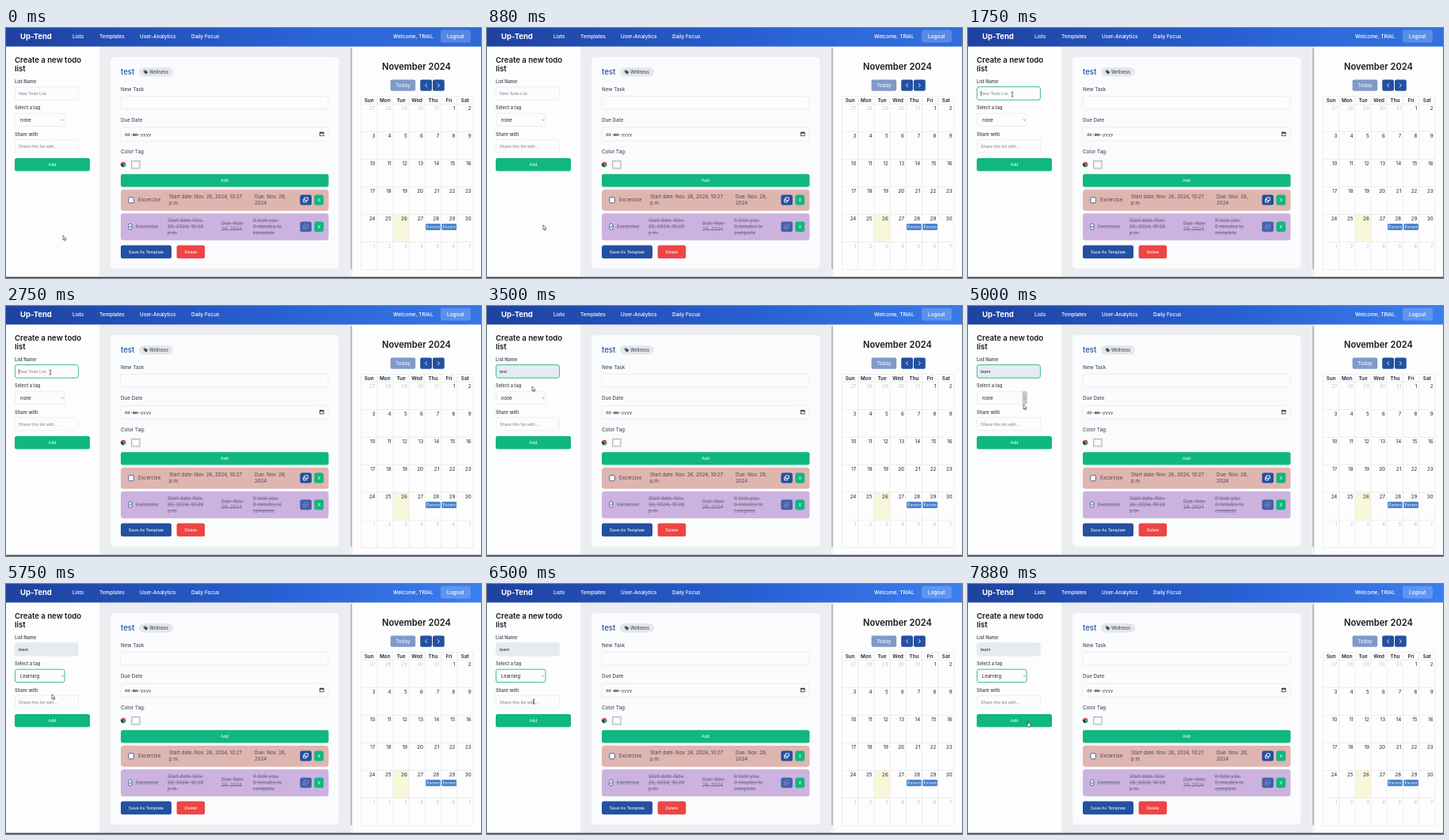
An HTML page for the animation above (8 s loop, 600 px wide and 317 px high).

```html
<!DOCTYPE html>
<html lang="en">
<head>
<meta charset="utf-8">
<title>Todo lists</title>
<style>
html, body { margin: 0; width: 100%; height: 100%; overflow: hidden; background: #fdfdfd; }
svg { display: block; width: 100vw; height: 100vh; }
text { font: 500 6.25px Inter, sans-serif; fill: #4a5260; white-space: pre; }
.nav text { font-size: 6.45px; fill: #fff; }
.nav .brand { font-size: 9.5px; font-weight: 700; }
.title { font-size: 9.6px; font-weight: 600; fill: #14181f; }
.label text { font-size: 5.7px; font-weight: 600; }
.field { fill: #fcfcfd; stroke: #e5e7eb; stroke-width: .7; }
.focus { stroke: #3fba92; stroke-width: 1; }
.filled { fill: #e4ecf1; }
text.value { font: 400 5.55px "Liberation Sans", Arial, sans-serif; fill: #1b1f27; }
text.hint { fill: #7d8490; }
text.pick { font-size: 5.8px; font-weight: 400; fill: #1b1f27; }
text.date { font: 400 5.55px "Liberation Mono", monospace; fill: #222; }
text.btn { font: 400 5.55px "Liberation Sans", Arial, sans-serif; fill: #fff; text-anchor: middle; }
.green { fill: #10b77f; }
.blue { fill: #2350a0; }
.red { fill: #ef4444; }
.task text { font-weight: 400; font-size: 6.2px; fill: #4d4548; }
.task.done text { fill: #75688a; text-decoration: line-through; }
.task text.btn { font-size: 6.6px; fill: #fff; text-decoration: none; }
.line { fill: none; stroke: #fff; stroke-width: .9; stroke-linecap: round; stroke-linejoin: round; }
.grid { fill: none; stroke: #e1e3e8; stroke-width: .6; }
text.month { font-size: 11.1px; font-weight: 600; fill: #14181f; }
text.week { font-weight: 600; text-anchor: middle; fill: #20242c; }
text.day { font-weight: 400; text-anchor: end; fill: #20242c; }
text.other { fill: #c3c5c9; }
text.event { font-size: 5.4px; font-weight: 400; fill: #fff; }
</style>
</head>
<body>
<svg viewBox="0 0 600 317" preserveAspectRatio="none">
  <defs>
    <linearGradient id="bar">
      <stop offset="0" stop-color="#1e429f"/><stop offset=".55" stop-color="#285fd0"/><stop offset="1" stop-color="#3b7eee"/>
    </linearGradient>
    <linearGradient id="dim">
      <stop offset=".6" stop-color="#1f4fb8" stop-opacity="0"/><stop offset="1" stop-color="#1f4fb8" stop-opacity=".45"/>
    </linearGradient>
  </defs>

  <rect width="600" height="317" fill="#fdfdfd"/>
  <rect x="118" y="23" width="316" height="292" fill="#ebedf0"/>
  <rect x="434" y="23" width="4" height="292" fill="#f1f2f4"/>
  <rect x="435" y="25" width="2" height="281" rx="1" fill="#b6bcc5"/>
  <rect y="315.6" width="600" height="1.4" fill="#45484d"/>

  <g class="nav">
    <rect width="600" height="23.5" fill="url(#bar)"/>
    <rect id="shade" width="600" height="23.5" fill="url(#dim)"/>
    <text class="brand" x="18" y="14">Up-Tend</text>
    <text x="84" y="12.9">Lists</text>
    <text x="118" y="12.9">Templates</text>
    <text x="169" y="12.9">User-Analytics</text>
    <text x="234" y="12.9">Daily Focus</text>
    <text x="489" y="12.9">Welcome, TRIAL</text>
    <rect x="549" y="2.5" width="38" height="16" rx="3" fill="#fff" fill-opacity=".2"/>
    <text x="557" y="12.9">Logout</text>
  </g>

  <text class="title" x="11" y="44">Create a new todo</text>
  <text class="title" x="11" y="55">list</text>
  <g class="label">
    <text x="11" y="70">List Name</text>
    <text x="11" y="103.3">Select a tag</text>
    <text x="11" y="137.2">Share with</text>
  </g>
  <rect id="name" class="field" x="11.4" y="74.6" width="80" height="16.6" rx="2.5"/>
  <text id="nameText" class="value" x="16" y="85"></text>
  <path id="caret" d="M16.4 79.8v6.6" stroke="#222" stroke-width=".6"/>
  <rect id="tag" class="field" x="11.4" y="108.2" width="62.6" height="16.4" rx="2.5"/>
  <rect id="tagHover" x="68.6" y="108" width="6.2" height="16.8" rx="1.5" fill="#c5c8cd"/>
  <text id="tagText" class="pick" x="18" y="118.8"></text>
  <path d="M69.8 116l1.4 1.4 1.4-1.4" fill="none" stroke="#666" stroke-width=".7"/>
  <rect class="field" x="11.4" y="141.4" width="80" height="16.6" rx="2.5"/>
  <text class="value hint" x="16" y="151.9">Share this list with...</text>
  <rect class="green" x="11" y="165" width="95" height="16.6" rx="2.5"/>
  <text class="btn" x="58.5" y="175.3">Add</text>

  <rect x="132" y="37" width="288.5" height="268" rx="4.5" fill="#fafbfc"/>
  <text x="145" y="58.8" style="font-size:9.6px;fill:#2350a0">test</text>
  <rect x="168" y="50" width="43" height="11.4" rx="5.7" fill="#e5e7eb"/>
  <path d="M173.8 53.4h2.8l2.8 2.8-2.6 2.6-3-3z" fill="#434b58"/>
  <circle cx="175.1" cy="54.7" r=".5" fill="#e5e7eb"/>
  <text x="181" y="57.8" style="font-size:5.6px">Wellness</text>
  <text x="145" y="79.8">New Task</text>
  <rect class="field" x="145" y="86.4" width="262" height="16.4" rx="2.5"/>
  <text x="145" y="119">Due Date</text>
  <rect class="field" x="145" y="126.2" width="262" height="17" rx="2.5"/>
  <text class="date" x="150" y="136.6">dd-<tspan font-weight="700">mm</tspan>-yyyy</text>
  <g fill="none" stroke="#222" stroke-width=".7">
    <rect x="396.6" y="132.4" width="4.6" height="4.4"/>
    <path d="M396.6 133.2h4.6M397.7 131.5v1M400.1 131.5v1" stroke-width="1"/>
  </g>
  <text x="145" y="159">Color Tag:</text>
  <path d="M148.2 173l-2.9-1.7a3.4 3.4 0 0 1 6.2.9z" fill="#e0403a"/>
  <path d="M148.2 173l3.3-.8a3.4 3.4 0 0 1-3 4.2z" fill="#1ca765"/>
  <path d="M148.2 173l.3 3.4a3.4 3.4 0 0 1-3.2-5.1z" fill="#30343a"/>
  <rect x="158.6" y="168.4" width="10.6" height="9.8" fill="#efefef" stroke="#a4a7ab" stroke-width=".8"/>
  <rect x="160" y="169.8" width="7.8" height="7" fill="#fff" stroke="#c6c8cb" stroke-width=".4"/>
  <rect class="green" x="145" y="185.2" width="262.5" height="16.4" rx="2.5"/>
  <text class="btn" x="276" y="195.4">Add</text>

  <g class="task">
    <rect x="145" y="205" width="262.5" height="26.8" rx="3.5" fill="#dfb5b0"/>
    <rect x="154.8" y="214.8" width="6.6" height="7" rx="1.5" fill="#fff" stroke="#33558f" stroke-width=".9"/>
    <text x="167" y="219.8">Excercise</text>
    <text x="206" y="216">Start date: Nov. 26, 2024, 10:27</text>
    <text x="206" y="223.6">p.m.</text>
    <text x="314" y="216">Due: Nov. 28,</text>
    <text x="314" y="223.6">2024</text>
    <rect class="blue" x="371.4" y="211.6" width="14.6" height="12.8" rx="2.5"/>
    <path class="line" d="M377.4 215h4v3.6h-4zM377 217.2h-1.4v3.6h4v-1.6"/>
    <rect class="green" x="389.4" y="211.6" width="11.8" height="12.8" rx="2.5"/>
    <text class="btn" x="395.3" y="220.2">x</text>
  </g>
  <g class="task done">
    <rect x="145" y="235" width="262.5" height="34.2" rx="3.5" fill="#ccb3df"/>
    <rect x="154.8" y="248.2" width="4.2" height="7.4" rx="1.4" fill="#fff" stroke="#33558f" stroke-width=".9"/>
    <path d="M155.8 252l.9 1.2 1.5-3" fill="none" stroke="#33558f" stroke-width=".8"/>
    <text x="164" y="253.8">Excercise</text>
    <text x="204" y="246.2">Start date: Nov.</text>
    <text x="204" y="253.8">26, 2024, 10:28</text>
    <text x="204" y="261.6">p.m.</text>
    <text x="272" y="249.8">Due: Nov.</text>
    <text x="272" y="257.4">29, 2024</text>
    <text x="312" y="246.2">It took you:</text>
    <text x="312" y="253.8">0 minutes to</text>
    <text x="312" y="261.6">complete</text>
    <rect x="371.4" y="245.6" width="14.6" height="12.8" rx="2.5" fill="#4660aa"/>
    <path class="line" d="M377.4 249h4v3.6h-4zM377 251.2h-1.4v3.6h4v-1.6" opacity=".25"/>
    <rect class="green" x="389.4" y="245.6" width="11.8" height="12.8" rx="2.5"/>
    <text class="btn" x="395.3" y="254.2">x</text>
  </g>
  <rect class="blue" x="145" y="275.6" width="64" height="16.6" rx="2.5"/>
  <text class="btn" x="177" y="285.9">Save As Template</text>
  <rect class="red" x="215.6" y="275.6" width="35.6" height="16.6" rx="2.5"/>
  <text class="btn" x="233.4" y="285.9">Delete</text>

  <text class="month" x="475" y="53.2">November 2024</text>
  <rect x="485.6" y="65.6" width="31.6" height="14.2" rx="2" fill="#7f9aca"/>
  <text x="501.4" y="75" text-anchor="middle" style="fill:#eef2f9">Today</text>
  <rect class="blue" x="523.2" y="65.6" width="14.8" height="14.2" rx="2"/>
  <rect class="blue" x="539" y="65.6" width="14.8" height="14.2" rx="2"/>
  <path class="line" d="M531.6 70.6l-2 2.1 2 2.1M545.4 70.6l2 2.1-2 2.1"/>
  <g id="calendar"></g>

  <g id="pointer">
    <path id="arrow" d="M0 0v6l1.4-1.2 1 2.1.9-.4-1-2h1.9z" fill="#fff" stroke="#222" stroke-width=".6"/>
    <path id="beam" d="M-1.3-2.8q1.3 0 1.3.8q0-.8 1.3-.8M0-2v4.4M-1.3 3.2q1.3 0 1.3-.8q0 .8 1.3.8" fill="none" stroke="#222" stroke-width=".7"/>
    <path id="hand" d="M-.6-1.6q.6-.8 1.2 0v2.2l2 .5q.6.3.4 1.2l-.5 2.5h-3.1l-1.9-2.6q.1-.9 1.2-.2l.7.6z" fill="#fff" stroke="#222" stroke-width=".6"/>
  </g>
</svg>
<script>
const $ = id => document.getElementById(id);
const LOOP = 8000, STEP = 125;

function add(name, attrs, text) {
  const el = document.createElementNS("http://www.w3.org/2000/svg", name);
  for (const key in attrs) el.setAttribute(key, attrs[key]);
  if (text !== undefined) el.textContent = text;
  $("calendar").append(el);
}

function drawCalendar() {
  const left = 448.5, top = 96.4, w = 20.2, h = 35, right = left + 7 * w, bottom = top + 6 * h;
  add("rect", { x: left + 2 * w, y: top + 4 * h, width: w, height: h, fill: "#f9f7d9" });
  let lines = `M${left} 86.6H${right}`;
  for (let r = 0; r <= 6; r++) lines += `M${left} ${top + r * h}H${right}`;
  for (let c = 0; c <= 7; c++) lines += `M${left + c * w} 86.6V${bottom}`;
  add("path", { d: lines, class: "grid" });
  "Sun Mon Tue Wed Thu Fri Sat".split(" ").forEach((day, c) =>
    add("text", { x: left + (c + .5) * w, y: 93.8, class: "week" }, day));
  for (let i = 0; i < 42; i++) {
    const n = i - 4, inMonth = n > 0 && n <= 30;
    const day = n < 1 ? n + 31 : n > 30 ? n - 30 : n;
    add("text", {
      x: left + (i % 7 + 1) * w - 2.3, y: top + Math.floor(i / 7) * h + 7.8,
      class: inMonth ? "day" : "day other"
    }, day);
  }
  for (const c of [4, 5]) {
    const x = left + c * w + .9;
    add("rect", { x, y: 248.2, width: w - 1.6, height: 8, rx: 1.2, fill: "#3f7cc9" });
    add("text", { x: x + 1, y: 254.2, class: "event" }, "Excerc");
  }
}

// time, x, y
const path = [
  [0, 72, 263], [750, 72, 263], [1500, 56, 84], [2750, 56, 84], [3375, 57, 102],
  [3750, 57, 102], [4125, 57, 112], [4375, 58, 112], [4875, 70, 125], [5250, 70, 125],
  [5750, 58, 140], [6250, 59, 149], [6625, 59, 149], [7250, 75, 176], [7875, 76, 176], [8000, 76, 176]
];

function pointerAt(t) {
  const i = path.findIndex(p => p[0] > t), [t0, x0, y0] = path[i - 1], [t1, x1, y1] = path[i];
  const u = (t - t0) / (t1 - t0), k = u * u * (3 - 2 * u);
  return [x0 + (x1 - x0) * k, y0 + (y1 - y0) * k];
}

const show = (id, on) => { $(id).style.display = on ? "" : "none"; };

function draw(t) {
  const [x, y] = pointerAt(t);
  const within = (a, b) => y > a && y < b;
  const shape = within(165, 182) ? "hand" : within(74, 91) || within(141, 158) ? "beam" : "arrow";
  $("pointer").setAttribute("transform", `translate(${x} ${y})`);
  for (const id of ["arrow", "beam", "hand"]) show(id, id === shape);

  const value = t < 3250 ? "" : t < 4000 ? "test" : "learn";
  const typing = t >= 1625 && t < 5125, picked = t >= 5625;
  $("nameText").textContent = value || "New Todo List";
  $("nameText").classList.toggle("hint", !value);
  $("name").classList.toggle("filled", !!value);
  $("name").classList.toggle("focus", typing);
  show("caret", typing && !value && (t - 1625) % 1000 < 500);
  $("tagText").textContent = picked ? "Learning" : "none";
  $("tag").classList.toggle("focus", t >= 5125);
  show("tagHover", t >= 4750 && !picked);
  $("shade").setAttribute("opacity", Math.max(0, 1 - t / 4500));
}

function frame(now) {
  draw(Math.floor(now % LOOP / STEP) * STEP);
  requestAnimationFrame(frame);
}

drawCalendar();
draw(0);
requestAnimationFrame(frame);
</script>
</body>
</html>
```
